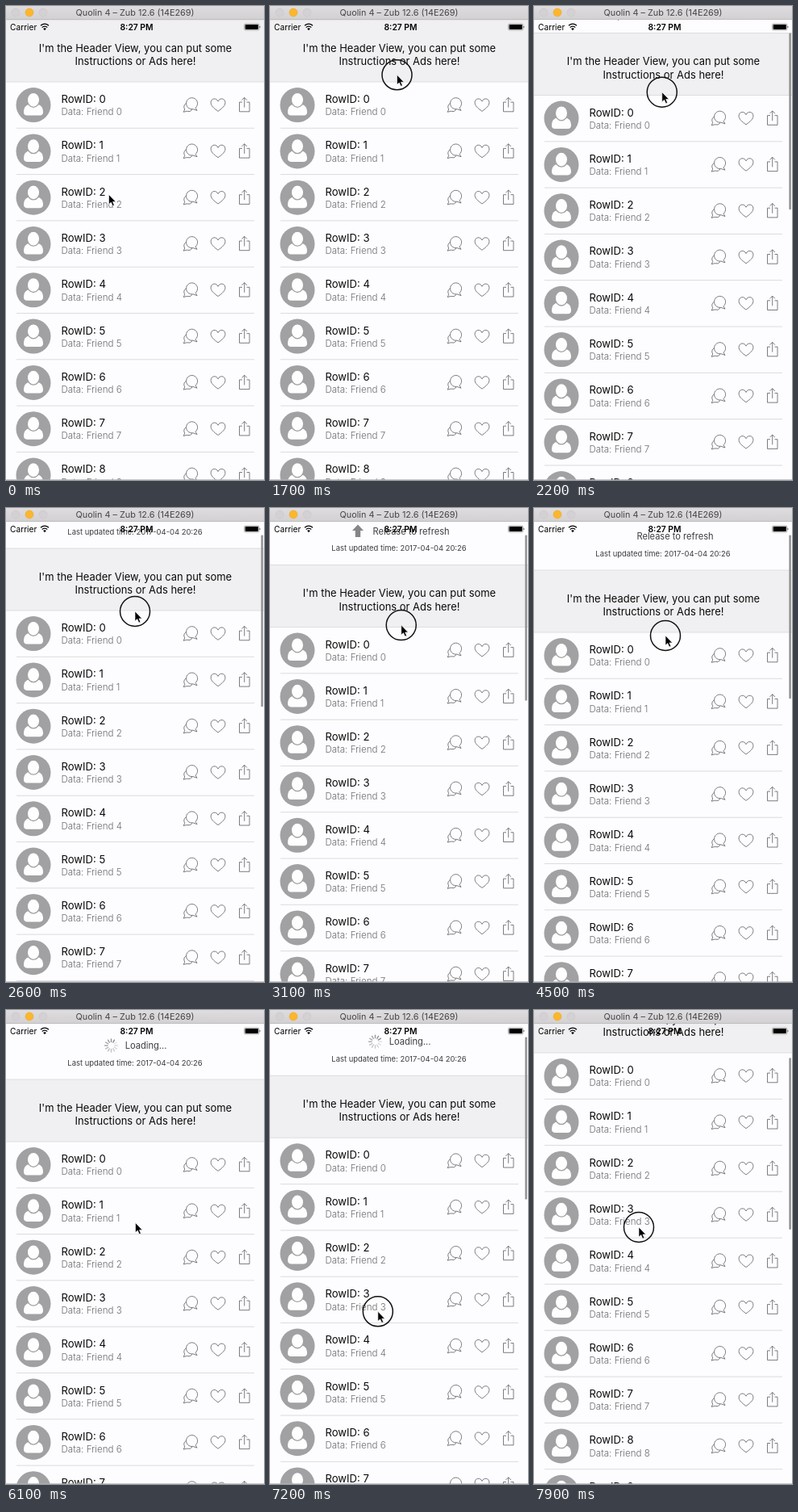
An HTML page that plays this animation: 320x587 px, repeating every 8 s.

```html
<!DOCTYPE html>
<html lang="en">
<head>
<meta charset="utf-8">
<title>Pull to refresh</title>
<style>
  html, body { margin: 0; width: 100%; height: 100%; overflow: hidden; background: #fdfcfe; }
  svg { display: block; width: 320px; height: 587px; font-family: Inter, Roboto, sans-serif; }
  .mid { text-anchor: middle; }
  .name { font-size: 13.1px; fill: #0a0a0a; }
  .data { font-size: 11.6px; font-weight: 300; fill: #6c6c6e; }
  .pull { fill: #3c3c3e; text-anchor: middle; }
  .line { fill: none; stroke: #5c5c5e; stroke-width: .8; stroke-linejoin: round; }
</style>
</head>
<body>
<svg viewBox="0 0 320 587">
  <defs>
    <linearGradient id="chrome" x2="0" y2="1">
      <stop stop-color="#dedcde"/><stop offset="1" stop-color="#d2d0d2"/>
    </linearGradient>
    <g id="cell">
      <circle cx="34" cy="28.6" r="21.5" fill="#a1a0a2"/>
      <path d="M22 37.5c0-5.5 2.6-9 7.4-9.4h9.2c4.800.4 7.400 3.900 7.400 9.400 0 2.800-1.400 4.100-4 4.100H26c-2.600 0-4-1.300-4-4.100z" fill="#fefefe"/>
      <ellipse cx="34" cy="22.300" rx="7.700" ry="9" fill="#fefefe" stroke="#a1a0a2" stroke-width="1.300"/>
      <g class="line" transform="translate(0 -.4)">
        <path d="M235 32.500l2 3.300-5.300-1.800a7 7 0 1 1 3.300-1.500z"/>
        <path d="M223.400 26.800a6 6 0 0 0-1.700 7.700l-1.500 3.200 4-1a6 6 0 0 0 7-2.200"/>
        <path d="M263 36.800c-5.500-4-8.900-7-8.900-10.700 0-5.700 7-6.400 8.900-1.600 1.900-4.800 8.900-4.100 8.900 1.600 0 3.700-3.400 6.700-8.900 10.700z"/>
        <path d="M293 25.500h-3.500v11.700h12.500V25.500h-3.500M295.700 32V19.800M292.500 23l3.200-3.200 3.200 3.200"/>
      </g>
      <path d="M13 57.300H308" stroke="#d9d8da" stroke-width=".9"/>
    </g>
  </defs>

  <rect width="320" height="587" fill="#fdfcfe"/>
  <g id="list">
    <g class="pull">
      <text id="state" y="-21" font-size="11.1"></text>
      <text x="160" y="-.4" font-size="9.43">Last updated time: 2017-04-04 20:26</text>
      <path id="arrow" d="M0-8L7-.5H3.2V7.5H-3.2V-.5H-7z" fill="#858587"/>
      <g id="spinner" transform="translate(130.5 -25)"></g>
    </g>
    <rect y="17" width="320" height="77" fill="#f0eff1"/>
    <path d="M0 17H320M0 94H320" stroke="#d8d7d9" stroke-width=".8"/>
    <g class="mid" font-size="12.95" fill="#0a0a0a">
      <text x="160.5" y="56.8">I'm the Header View, you can put some</text>
      <text x="160.5" y="73">Instructions or Ads here!</text>
    </g>
    <g id="rows"></g>
  </g>
  <rect id="bar" x="316.4" width="2.4" rx="1.2" fill="#8e8e90"/>

  <g fill="#000">
    <text x="5" y="29.7" font-size="10.2">Carrier</text>
    <text class="mid" x="162" y="29.7" font-size="10.3" font-weight="600">8:27 PM</text>
    <path d="M43 24.3q5-4.3 10 0M44.7 26.4q3.3-2.7 6.6 0" fill="none" stroke="#000" stroke-width="1.3"/>
    <path d="M48 30.2l-1.9-2.2q1.9-1.5 3.8 0z"/>
    <rect x="295.6" y="22.1" width="18.2" height="7.8" rx="1.600" fill="#fff" stroke="#666" stroke-width=".6"/>
    <rect x="296.6" y="23.1" width="16.2" height="5.8" rx=".8"/>
    <path d="M314.6 24.500q1.800 1.500 0 3z"/>
  </g>

  <rect width="320" height="17" fill="url(#chrome)"/>
  <path d="M0 16.6H320" stroke="#b8b6b8" stroke-width=".8"/>
  <g stroke-width=".6" fill="#d3d1d3" stroke="#c8c6c8">
    <circle cx="12" cy="8" r="5"/>
    <circle cx="29" cy="8" r="5" fill="#fdb62b" stroke="#e8a830"/>
    <circle cx="46" cy="8" r="5"/>
  </g>
  <text class="mid" x="160" y="11.9" font-size="10.85" fill="#454446">Quolin 4 – Zub 12.6 (14E269)</text>
  <path d="M0 586.6H320" stroke="#b4b3b5" stroke-width=".8"/>

  <g id="pointer">
    <circle id="ring" r="18.5" fill="none" stroke="#111" stroke-width="1.5"/>
    <path d="M0 0V12L2.8 9.6 4.8 14 6.8 13.2 4.900 8.900H8.600z" fill="#000" stroke="#fff" stroke-width=".6"/>
  </g>
</svg>
<script>
const $ = id => document.getElementById(id);
const PITCH = 57.3, LOOP = 8000;

$('rows').innerHTML = Array.from({ length: 10 }, (_, i) =>
  `<g transform="translate(0 ${94 + i * PITCH})"><use href="#cell"/>
   <text class="name" x="68.5" y="26">RowID: ${i}</text>
   <text class="data" x="68.5" y="41.4">Data: Friend ${i}</text></g>`).join('');

$('spinner').innerHTML = Array.from({ length: 12 }, (_, i) =>
  `<path d="M0-4.4V-8" stroke="#858587" stroke-width="1.3" stroke-linecap="round" transform="rotate(${i * 30})"/>`).join('');
const spokes = [...$('spinner').children];

// Keys are [time, ...values]; each span eases in and out.
const offsetKeys = [[1800, 0], [2600, 33], [3400, 63], [4200, 63], [4500, 60], [5000, 69], [7100, 69], [7900, -41]];
const pointerKeys = [[300, 127.5, 233.5], [1600, 157.5, 85.3], [1800, 157.5, 85.3], [2600, 160, 128],
  [3400, 164, 153], [3900, 165, 153], [4500, 163, 158], [5200, 163, 160], [6100, 160.5, 263.5],
  [7000, 134, 378], [7100, 134, 378], [7900, 130, 269]];
const fadeKeys = [[1800, 0], [2000, 1], [5200, 1], [5500, 0], [7100, 0], [7200, 1]];

function at(keys, t) {
  const n = keys.findIndex(k => k[0] > t);
  if (n < 1) return (n ? keys[keys.length - 1] : keys[0]).slice(1);
  const a = keys[n - 1], b = keys[n];
  const u = (t - a[0]) / (b[0] - a[0]);
  const e = u * u * (3 - 2 * u);
  return a.slice(1).map((v, i) => v + (b[i + 1] - v) * e);
}

const show = (el, on) => el.setAttribute('visibility', on ? 'visible' : 'hidden');
const place = (el, x, y, turn = 0) => el.setAttribute('transform', `translate(${x} ${y}) rotate(${turn})`);

function draw(t) {
  const [off] = at(offsetKeys, t), [x, y] = at(pointerKeys, t);
  const loading = t >= 4600, ready = off > 52;

  place($('list'), 0, off);
  $('state').textContent = loading ? 'Loading...' : ready ? 'Release to refresh' : 'Pull down to refresh';
  $('state').setAttribute('x', loading ? 173.6 : 175);
  place($('arrow'), 109, -25, ready ? 0 : 180);
  show($('arrow'), t < 4450);
  show($('spinner'), loading);
  const head = Math.floor(t * 12 / 1000);
  spokes.forEach((s, i) => s.setAttribute('opacity', 1 - ((head - i) % 12 + 12) % 12 * .07));

  $('bar').setAttribute('y', 33.4 + Math.max(0, -off) * .63);
  $('bar').setAttribute('height', 225 - Math.abs(off) * (off > 0 ? .37 : .3));
  $('bar').setAttribute('opacity', at(fadeKeys, t)[0]);

  place($('pointer'), x, y);
  show($('ring'), t >= 1600 && t < 4600 || t >= 7100);
}

const start = performance.now();
function tick() {
  const t = (performance.now() - start) % LOOP;
  draw(Math.floor(t / 100) * 100);
  requestAnimationFrame(tick);
}
tick();
</script>
</body>
</html>
```
